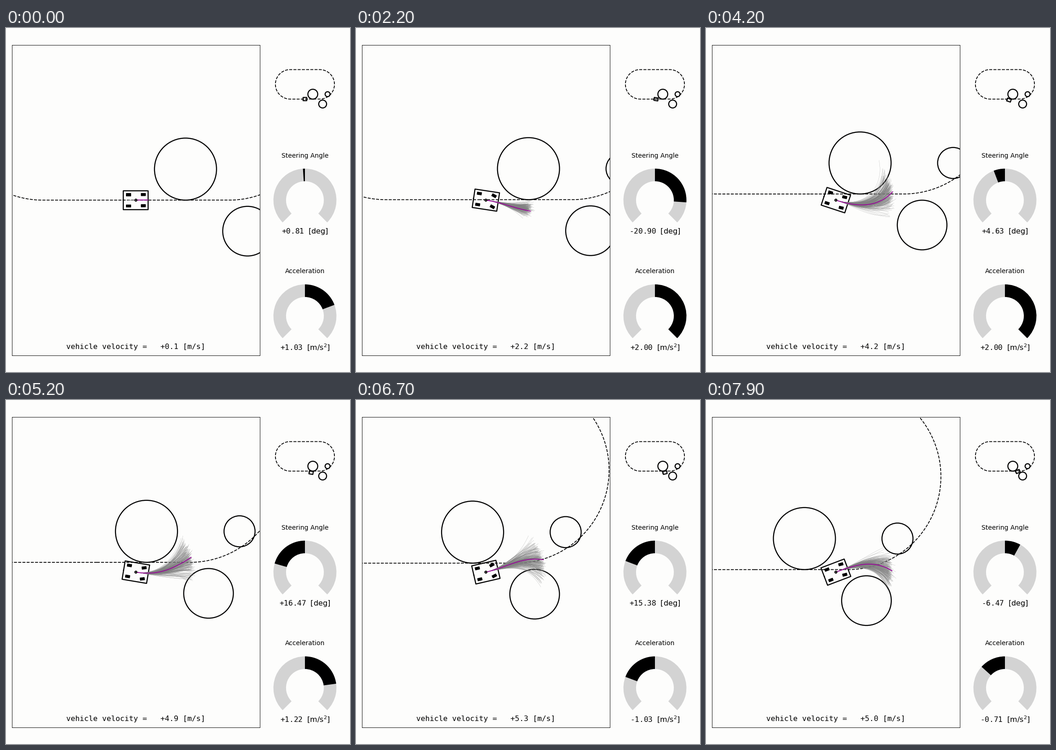
A matplotlib script that plays this animation: 748x748 px, repeating every 8 s.

```python
import numpy as np
import matplotlib.pyplot as plt
from matplotlib.animation import FuncAnimation
from matplotlib.collections import LineCollection
from matplotlib.patches import Circle, Wedge

SIZE = 748
FRAMES = 80
DT = 0.05           # simulated seconds per frame
WHEELBASE = 2.5
CAR_L, CAR_W = 4.0, 3.0
MAX_STEER, MAX_ACCEL = 30.0, 2.0
PX = 13.49          # main view pixels per metre
PAPER = "#fdfdfc"
OBSTACLES = [(8, 5, 5), (18, -5, 4), (23, 5, 2.5)]
SAMPLES = 260

# controls
STEER_T = [0, 6, 14, 20, 25, 30, 36, 42, 47, 52, 57, 62, 67, 72, 79]
STEER = [0.81, -6, -17.11, -21.5, -20, -11.03, -3, 4.63, 9, 16.47,
         14, 13, 15.38, 9, -6.47]
ACCEL_T = [0, 1, 2, 3, 42, 47, 52, 56, 62, 67, 71, 75, 79]
ACCEL = [1.03, 1.6, 1.95, 2, 2, 1, 1.22, 0.9, 1, -1.03, -0.3, -0.4, -0.71]

# pose and planned path at key times
KEYS = [0, 14, 30, 42, 52, 67, 79]
POSE_X = [0, 0.46, 2.10, 4.10, 6.29, 10.14, 13.07]
POSE_Y = [0, -0.01, -0.29, -0.99, -1.58, -1.45, -0.41]
YAW = np.radians([0, -2, -16, -18.2, -9.5, 13, 20.8])
PLAN_X = [27, 74, 120, 123, 120, 125, 122]
PLAN_Y = [0, -34, -14, 18, 32, 27, 3]
PLAN_DIR = np.radians([0, -42, 21, 48, 33, -8, -32])
FAN_WIDTH = [0.01, 0.05, 0.10, 0.15, 0.16, 0.16, 0.15]
FAN_BIAS = [0, 0.07, 0, 0.04, 0, 0, 0]
FAN_LEN = [0, 0.93, 0.95, 0.97, 0.98, 0.97, 0.97]
FAN_LEN_SD = [0.3, 0.07, 0.03, 0.03, 0.03, 0.03, 0.03]

frames = np.arange(FRAMES)
steer = np.interp(frames, STEER_T, STEER)
accel = np.interp(frames, ACCEL_T, ACCEL)
speed = np.cumsum(accel) * DT


def blend(s, p0, p1, t0, t1):
    """Cubic Hermite segment."""
    return (p0 * (1 + 2 * s) * (1 - s) ** 2 + t0 * s * (1 - s) ** 2
            + p1 * s * s * (3 - 2 * s) + t1 * s * s * (s - 1))


def track(values, slopes):
    """Smooth curve over all frames through the key values."""
    i = np.clip(np.searchsorted(KEYS, frames, side="right") - 1, 0, len(KEYS) - 2)
    keys, values = np.array(KEYS), np.array(values)
    span = keys[i + 1] - keys[i]
    return blend((frames - keys[i]) / span, values[i], values[i + 1],
                 slopes[i] * span, slopes[i + 1] * span)


key_speed = speed[KEYS] * DT
pos_x = track(POSE_X, key_speed * np.cos(YAW))
pos_y = track(POSE_Y, key_speed * np.sin(YAW))
yaw = track(YAW, key_speed / WHEELBASE * np.tan(np.radians(steer[KEYS])))


def oval(straight=15, r=15, n=200):
    """Closed course starting and ending at the origin."""
    a = np.linspace(-np.pi / 2, np.pi / 2, n)
    edge = np.linspace(0, straight, 60)
    flat = np.zeros_like(edge)
    x = [edge, straight + r * np.cos(a), np.linspace(straight, -straight, 120),
         -straight - r * np.cos(a), edge - straight]
    y = [flat, r + r * np.sin(a), np.full(120, 2 * r), r - r * np.sin(a), flat]
    return np.concatenate(x), np.concatenate(y)


course_x, course_y = oval()

fig = plt.figure(figsize=(9, 9), dpi=SIZE / 9, facecolor=PAPER)


def panel(cx, cy, scale, half_w, half_h, mid=(0, 0)):
    """Axes centred on a pixel, with the given pixels per unit."""
    w, h = half_w * scale, half_h * scale
    ax = fig.add_axes([(cx - w) / SIZE, 1 - (cy + h) / SIZE,
                       2 * w / SIZE, 2 * h / SIZE], facecolor=PAPER)
    ax.set(xlim=(mid[0] - half_w, mid[0] + half_w),
           ylim=(mid[1] - half_h, mid[1] + half_h), xticks=[], yticks=[])
    return ax


main = panel(282.4, 374.3, PX, 20, 25)
minimap = panel(650, 122.5, 2.14, 38, 38, (0, 15))
minimap.axis("off")


def obstacle(ax, x, y, r):
    return ax.add_patch(Circle((x, y), r, fc=PAPER, ec="black", lw=2, zorder=0))


minimap.plot(course_x, course_y, "k--", lw=1.5)
for spot in OBSTACLES:
    obstacle(minimap, *spot)


def gauge(cy, title):
    ax = panel(650, cy, 68.5, 1.25, 1.25)
    ax.axis("off")
    ax.set_title(title, fontsize=12)
    ax.add_patch(Wedge((0, 0), 1, -45, 225, width=0.4, fc="lightgray", lw=0))
    hand = ax.add_patch(Wedge((0, 0), 1, 90, 91, width=0.4, fc="black", lw=0))
    label = ax.text(0, -1, "", ha="center", va="center", fontsize=14,
                    fontfamily="monospace")
    return hand, label


steer_gauge = gauge(374.3, "Steering Angle")
accel_gauge = gauge(626, "Acceleration")


def set_gauge(parts, turn, text):
    """turn runs from -1 (full right) to +1 (full left)."""
    hand, label = parts
    end = 90 + 135 * turn
    hand.set_theta1(min(90, end))
    hand.set_theta2(max(90, end))
    label.set_text(text)


def box(length, width, angle, x=0, y=0):
    px = np.array([-1, -1, 1, 1, -1, -1]) * length / 2
    py = np.array([0, 1, 1, -1, -1, 0]) * width / 2
    c, s = np.cos(angle), np.sin(angle)
    return np.column_stack([px * c - py * s + x, px * s + py * c + y])


course, = main.plot([], [], "k--", lw=1.5)
body, = main.plot([], [], "k-", lw=2, zorder=3)
plan, = main.plot([], [], color="#990099", lw=1.5, zorder=5)
wheels = [main.fill([0, 1, 1], [0, 0, 1], color="black", zorder=3)[0]
          for _ in range(4)]
main.add_patch(Circle((0, 0), CAR_W / 20, fc=PAPER, ec="black", lw=2, zorder=6))
rounds = [obstacle(main, *spot) for spot in OBSTACLES]
fan = main.add_collection(LineCollection([], colors="gray", linewidths=0.2,
                                         zorder=4), autolim=False)
readout = main.text(0.5, 0.02, "", ha="center", transform=main.transAxes,
                    fontsize=14, fontfamily="monospace")
mini_body, = minimap.plot([], [], "k-", lw=2, zorder=3)


def key(values, i):
    return np.interp(i, KEYS, values)


def planned(i):
    """Planned path as complex points in metres, from the car's centre."""
    end = (key(PLAN_X, i) + 1j * key(PLAN_Y, i)) / PX
    pull = 1.15 * abs(end)
    s = np.linspace(0, 1, 24)
    return s, blend(s, 0, end, pull * np.exp(1j * yaw[i]),
                    pull * np.exp(1j * key(PLAN_DIR, i)))


def draw(i):
    x, y, a = pos_x[i], pos_y[i], yaw[i]
    course.set_data(course_x - x, course_y - y)
    body.set_data(*box(CAR_L, CAR_W, a).T)
    mini_body.set_data(*box(CAR_L, CAR_W, a, x, y).T)

    spots = [(sx, sy) for sx in (-1, 1) for sy in (-1, 1)]
    for wheel, (sx, sy) in zip(wheels, spots):
        at = (0.3 * CAR_L * sx + 0.3j * CAR_W * sy) * np.exp(1j * a)
        turn = np.radians(steer[i]) if sx > 0 else 0
        wheel.set_xy(box(0.7, 0.4, a + turn, at.real, at.imag))

    for patch, (ox, oy, _) in zip(rounds, OBSTACLES):
        patch.center = (ox - x, oy - y)

    s, path = planned(i)
    plan.set_data(path.real, path.imag)

    # sampled paths: bend and stretch the plan at random
    rng = np.random.default_rng(100 + i)
    bend = rng.normal(key(FAN_BIAS, i), key(FAN_WIDTH, i), (SAMPLES, 1))
    curl = rng.normal(0, 0.5 * key(FAN_WIDTH, i), (SAMPLES, 1))
    reach = rng.normal(key(FAN_LEN, i), key(FAN_LEN_SD, i), (SAMPLES, 1))
    rays = path * reach * np.exp(1j * (bend * s + curl * s * (1 - 2 * s)))
    fan.set_segments(np.stack([rays.real, rays.imag], axis=-1))

    readout.set_text(f"vehicle velocity = {speed[i]:>+6.1f} [m/s]")
    set_gauge(steer_gauge, steer[i] / MAX_STEER,
              f"{steer[i]:+.2f} " + r"$ \rm{[deg]}$")
    set_gauge(accel_gauge, -accel[i] / MAX_ACCEL,
              f"{accel[i]:+.2f} " + r"$ \rm{[m/s^2]}$")
    return []


anim = FuncAnimation(fig, draw, frames=FRAMES, interval=100, repeat=True,
                     repeat_delay=0, blit=False)
plt.show()
```
